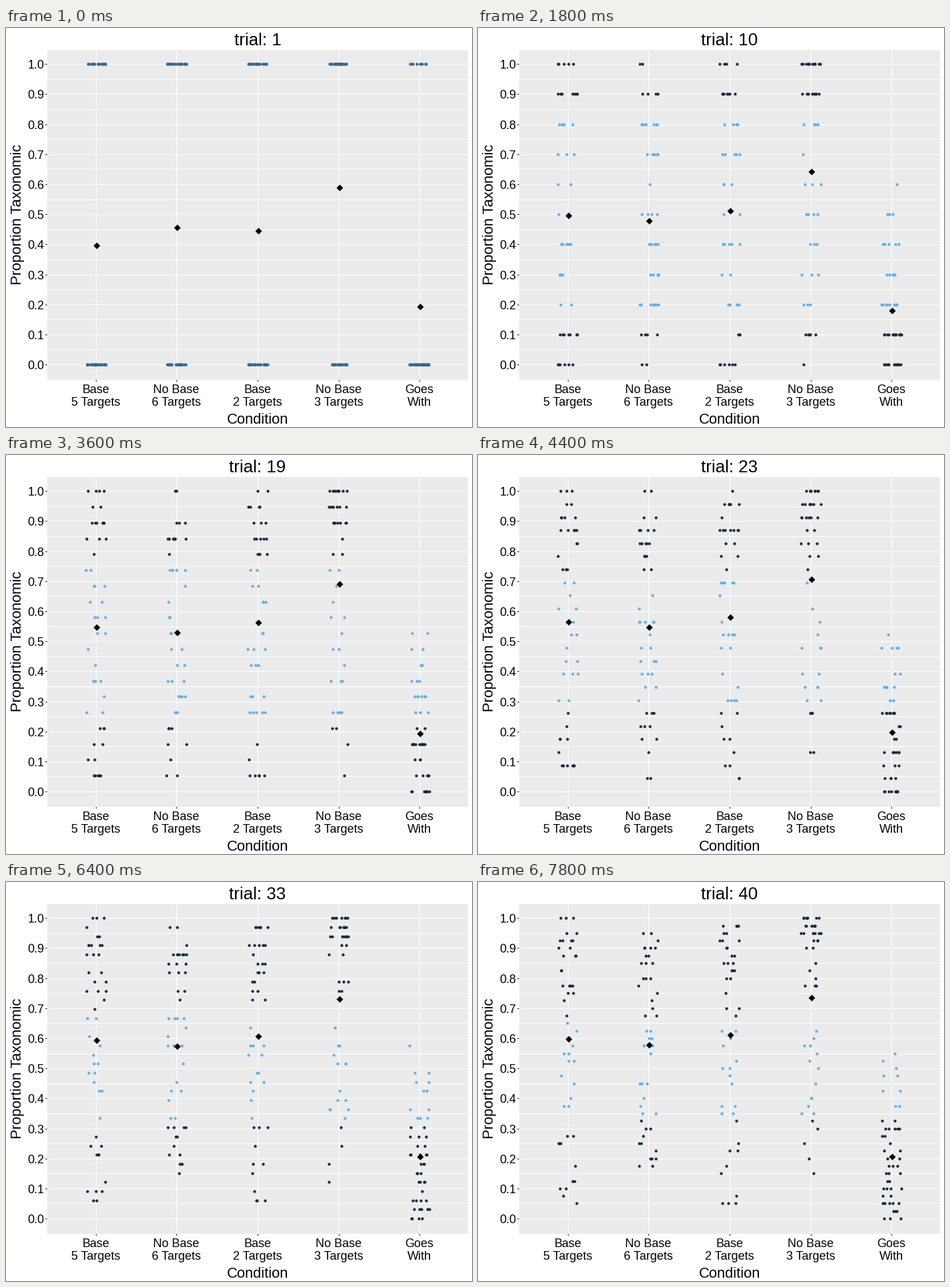
A matplotlib script that plays this animation: 700 px wide and 600 px high, repeating every 8000 ms.

```python
import math

import numpy as np
import matplotlib.pyplot as plt
from matplotlib.animation import FuncAnimation

W, H, DPI = 700, 600, 100
TRIALS, STEP_MS = 40, 200
LEFT, RIGHT, TOP, BOTTOM = 62, 694, 33, 529
X0, DX = 135.3, 121.6
Y0, SPAN = 506.05, 451.8
JITTER = 15
LIGHT, DARK, MIXED = "#56B1F7", "#132B43", "#336A98"
PEOPLE = 48
WARM_UP = 6

# label, spread of personal bias, group mean at trial 1, after warm-up, at the end
GROUPS = [
    ("Base\n5 Targets", 5.5, 0.398, 0.469, 0.600),
    ("No Base\n6 Targets", 4.2, 0.459, 0.453, 0.580),
    ("Base\n2 Targets", 6.2, 0.448, 0.485, 0.614),
    ("No Base\n3 Targets", 6.5, 0.591, 0.618, 0.738),
    ("Goes\nWith", 3.2, 0.195, 0.173, 0.209),
]


def x_px(group):
    return math.floor(X0 + DX * group)


def y_px(p):
    return round(Y0 - SPAN * p)


def mean(trial, first, warm, last):
    """Group mean: linear during warm-up, then easing out to the end."""
    if trial <= WARM_UP:
        return first + (warm - first) * (trial - 1) / (WARM_UP - 1)
    rest = (TRIALS - trial) / (TRIALS - WARM_UP)
    return last + (warm - last) * rest ** 2


def simulate(spread, means, seed):
    """Running count of choices, trials by people.

    On each trial the people with the strongest bias plus noise say yes,
    just as many as keep the group on its mean curve.
    """
    rng = np.random.default_rng(seed)
    bias = np.linspace(-spread / 2, spread / 2, PEOPLE)
    total = np.zeros(PEOPLE, int)
    history = []
    for t in range(1, TRIALS + 1):
        yes = round(PEOPLE * t * mean(t, *means)) - total.sum()
        order = np.argsort(-(bias + rng.logistic(size=PEOPLE)))
        total[order[:yes]] += 1
        history.append(total.copy())
    return history


HITS = [simulate(spread, means, 20 + g)
        for g, (_, spread, *means) in enumerate(GROUPS)]


def significant(k, n):
    """Two-sided binomial test against chance."""
    tail = sum(math.comb(n, j) for j in range(min(k, n - k) + 1))
    return 2 * tail / 2 ** n < 0.05


def dots(trial):
    rng = np.random.default_rng(700 + trial)
    pos, colors = [], []
    for g, history in enumerate(HITS):
        for k in map(int, history[trial - 1]):
            x = round(x_px(g) + rng.uniform(-JITTER, JITTER))
            pos.append((x + 0.5, y_px(k / trial) + 0.5))
            if trial < WARM_UP:
                colors.append(MIXED)
            else:
                colors.append(DARK if significant(k, trial) else LIGHT)
    return pos, colors


plt.rcParams["font.family"] = "Liberation Sans"
fig = plt.figure(figsize=(W / DPI, H / DPI), dpi=DPI, facecolor="white")
ax = fig.add_axes([0, 0, 1, 1])
ax.set_xlim(0, W)
ax.set_ylim(H, 0)
ax.axis("off")


def rect(x, y, w, h, color):
    ax.add_patch(plt.Rectangle((x, y), w, h, fc=color, lw=0, zorder=1))


def text(x, y, s, px, ha="center", **kw):
    return ax.text(x, y, s, fontsize=px * 72 / DPI, color="black", ha=ha,
                   va="baseline", **kw)


def points(marker, px, z):
    return ax.scatter([], [], s=(px * 72 / DPI) ** 2, marker=marker,
                      c="black", linewidths=0, zorder=z)


rect(LEFT, TOP, RIGHT - LEFT, BOTTOM - TOP, "#EBEBEB")
for i in range(21):
    y = y_px(i / 20)
    rect(LEFT, y, RIGHT - LEFT, 1, "white")
    if i % 2 == 0:
        rect(LEFT - 3, y, 3, 1, "#333333")
        text(57.5, y + 7, f"{i / 20:.1f}", 18, ha="right")
for g, (label, *_) in enumerate(GROUPS):
    x = x_px(g)
    rect(x, TOP, 1, BOTTOM - TOP, "white")
    rect(x, BOTTOM, 1, 3, "#333333")
    for row, line in enumerate(label.split("\n")):
        text(x, 549 + 19 * row, line, 18)

text(378, 595, "Condition", 22)
text(23, 280.5, "Proportion Taxonomic", 22, rotation=90,
     rotation_mode="anchor")
title = text(378, 26, "", 26)
people = points("o", 4.3, 3)
averages = points([(-1, 0), (0, 1), (1, 0), (0, -1)], 10, 4)


def draw(i):
    trial = i + 1
    pos, colors = dots(trial)
    people.set_offsets(pos)
    people.set_facecolors(colors)
    averages.set_offsets([(x_px(g) + 0.5, y_px(mean(trial, *m)) + 0.5)
                          for g, (_, _, *m) in enumerate(GROUPS)])
    title.set_text(f"trial: {trial}")
    return people, averages, title


anim = FuncAnimation(fig, draw, frames=TRIALS, init_func=lambda: draw(0),
                     interval=STEP_MS, repeat=True, repeat_delay=0)
plt.show()
```
